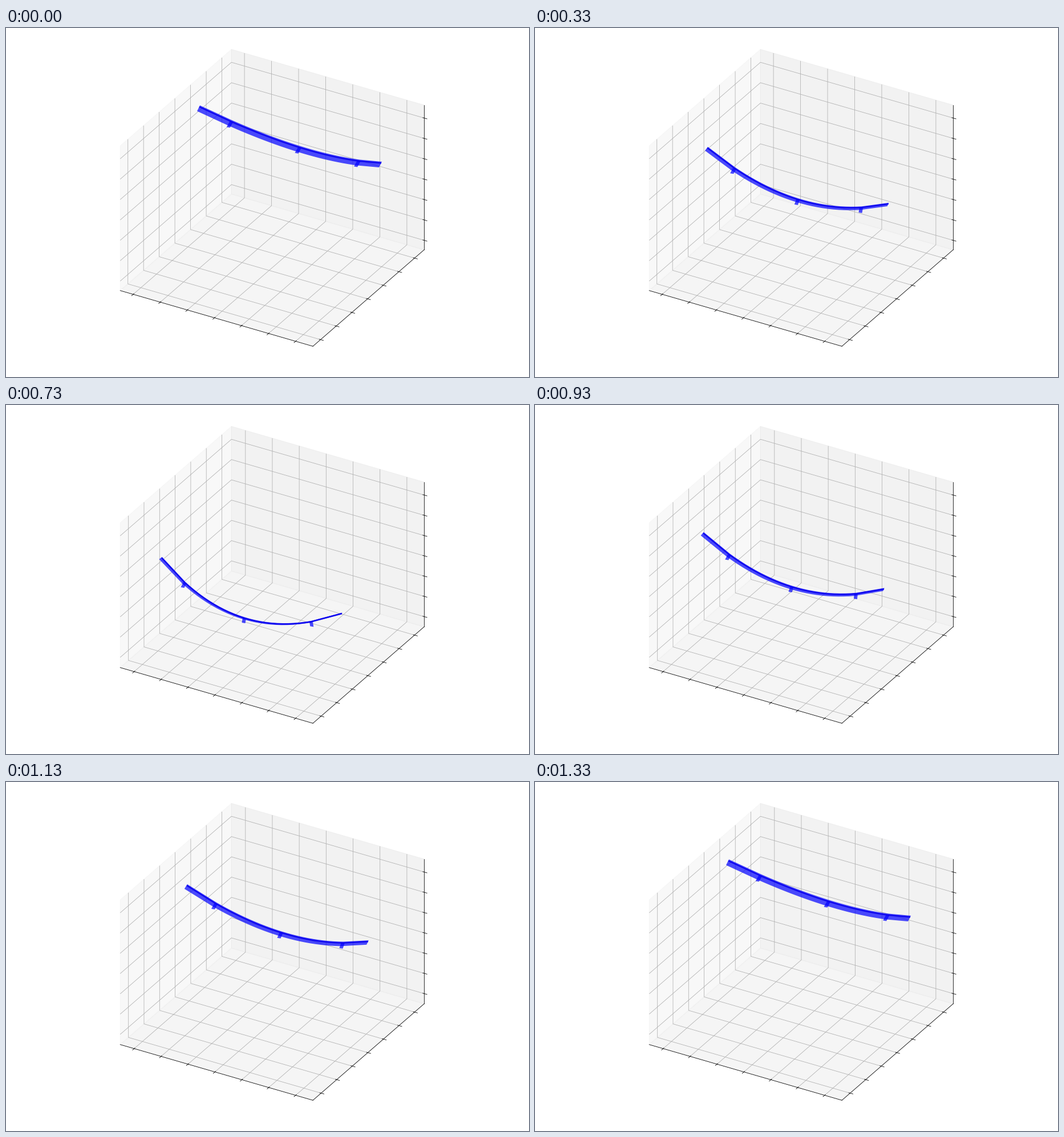
Animation, 917 px wide and 611 px high, one loop 1.36 s. Source, as a matplotlib script:

```python
import numpy as np
import matplotlib.pyplot as plt
from matplotlib.animation import FuncAnimation
from matplotlib.collections import LineCollection
from matplotlib.patches import Polygon

W, H, DPI = 917, 611, 100
PX = 72 / DPI                # one pixel in points
TICK_MS, LOOP_MS = 10, 1360
HALF = 20                    # steps from the highest to the lowest pose
LOW = 18                     # step at which the low pose below is reached
GROW_FROM = 12               # step at which the axis limits start to widen

# Orthographic box, elevation 30, azimuth -60, aspect 4:4:3 (pixels, y down)
CENTER = np.array([466.69, 297.31])
SIDE = 390.1
C, S = np.cos(np.pi / 6), np.sin(np.pi / 6)
AXES = SIDE * np.array([[C, S * S], [S, -C * S], [0, -0.75 * C]])

# First and last tick of x, y and z as fractions of the box
FIRST, LAST = (0.0675, 0.069, 0.0655), (0.9105, 0.914, 0.9105)
GROWTH = 0.005

# Ribbon: left tip, tip-to-tip vector, sag at mid-span; high and low pose
HIGH_ARC = np.array([(339, 138), (319, 98.5), (16.5, 22)])
LOW_ARC = np.array([(273, 267.5), (316, 97.5), (-13, 56.8)])
JOINTS = (0.15, 0.5, 0.85)
SPAN = np.concatenate([[0], np.linspace(JOINTS[0], JOINTS[-1], 25), [1]])


def mix(a, b, t):
    return np.asarray(a) + (np.asarray(b) - np.asarray(a)) * t


def project(*points):
    return CENTER + (np.array(points, float) - 0.5) @ AXES


def spine_at(u, s):
    """Parabolic sag along the chord between the tips."""
    u = np.reshape(u, (-1, 1))
    tip, chord, sag = mix(HIGH_ARC, LOW_ARC, s)
    return tip + u * chord + 4 * u * (1 - u) * sag


def ribbon(s):
    spine = spine_at(SPAN, s)
    low_edge = mix((-4.5, 2.5), (-0.5, 1.5), SPAN[:, None])
    lower = spine + mix((-4, 7.5), low_edge, s)
    upper = spine + mix((1, -2.5), (0.5, -1.5), s)
    return spine, np.vstack([upper, lower[::-1]])


def bracket(u, s):
    base = spine_at(u, s)[0]
    leg = mix((-5.5, 10), (8 * u - 5.5, 8.5), s)
    half = np.array([3, 0.5])
    return np.array([base - half, base + half,
                     base + half + leg, base - half + leg])


def grid_and_ticks(grow):
    xs, ys, zs = (np.linspace(a + GROWTH * grow, b, 7)
                  for a, b in zip(FIRST, LAST))
    grid = [project((t, 1, 1), (t, 1, 0), (t, 0, 0)) for t in xs]
    grid += [project((0, t, 1), (0, t, 0), (1, t, 0)) for t in ys]
    grid += [project((0, 0, t), (0, 1, t), (1, 1, t)) for t in zs]
    out, inn = 0.016, 0.008
    ticks = [project((t, -out, 0), (t, inn, 0)) for t in xs]
    ticks += [project((1 + out, t, 0), (1 - inn, t, 0)) for t in ys]
    ticks += [project((1 + out, 1, t), (1 - inn, 1, t)) for t in zs]
    return grid, ticks


fig = plt.figure(figsize=(W / DPI, H / DPI), dpi=DPI, facecolor="white")
ax = fig.add_axes([0, 0, 1, 1])
ax.set(xlim=(0, W), ylim=(H, 0))
ax.axis("off")

panes = [(0.95, [(0, 0, 0), (0, 1, 0), (0, 1, 1), (0, 0, 1)]),
         (0.90, [(0, 1, 0), (1, 1, 0), (1, 1, 1), (0, 1, 1)]),
         (0.925, [(0, 0, 0), (1, 0, 0), (1, 1, 0), (0, 1, 0)])]
for shade, corners in panes:
    ax.add_patch(Polygon(project(*corners), color=(shade,) * 3,
                         alpha=0.5, lw=PX))

thin = 0.8 * PX
grid_lines = LineCollection([], colors="#b0b0b0", linewidths=thin, zorder=2)
tick_lines = LineCollection([], colors="black", linewidths=thin, zorder=3)
ax.add_collection(grid_lines)
ax.add_collection(tick_lines)
edge = project((0, 0, 0), (1, 0, 0), (1, 1, 0), (1, 1, 1))
for a, b in zip(edge, edge[1:]):
    ax.plot(*zip(a, b), color="black", lw=thin, zorder=3)


def blue_patch(zorder):
    return ax.add_patch(Polygon(np.zeros((4, 2)), fc="blue", ec="none",
                                alpha=0.7, zorder=zorder))


sheet = blue_patch(4)
brackets = [blue_patch(5) for _ in JOINTS]
spine_line, = ax.plot([], [], color=(0.03, 0, 0.93), alpha=0.9, lw=1.7,
                      solid_capstyle="butt", zorder=6)


def update(i):
    step = (i * TICK_MS + 5) * 3 // 100      # 30 steps per second
    s = min(step, 2 * HALF - step) / LOW
    grow = np.clip((step - GROW_FROM) / (HALF - GROW_FROM), 0, 1)
    grid, ticks = grid_and_ticks(grow)
    grid_lines.set_segments(grid)
    tick_lines.set_segments(ticks)
    spine, outline = ribbon(s)
    sheet.set_xy(outline)
    spine_line.set_data(*spine.T)
    for patch, u in zip(brackets, JOINTS):
        patch.set_xy(bracket(u, s))
    return [grid_lines, tick_lines, sheet, spine_line, *brackets]


anim = FuncAnimation(fig, update, frames=LOOP_MS // TICK_MS, interval=TICK_MS,
                     repeat=True, repeat_delay=0, blit=False)
plt.show()
```
